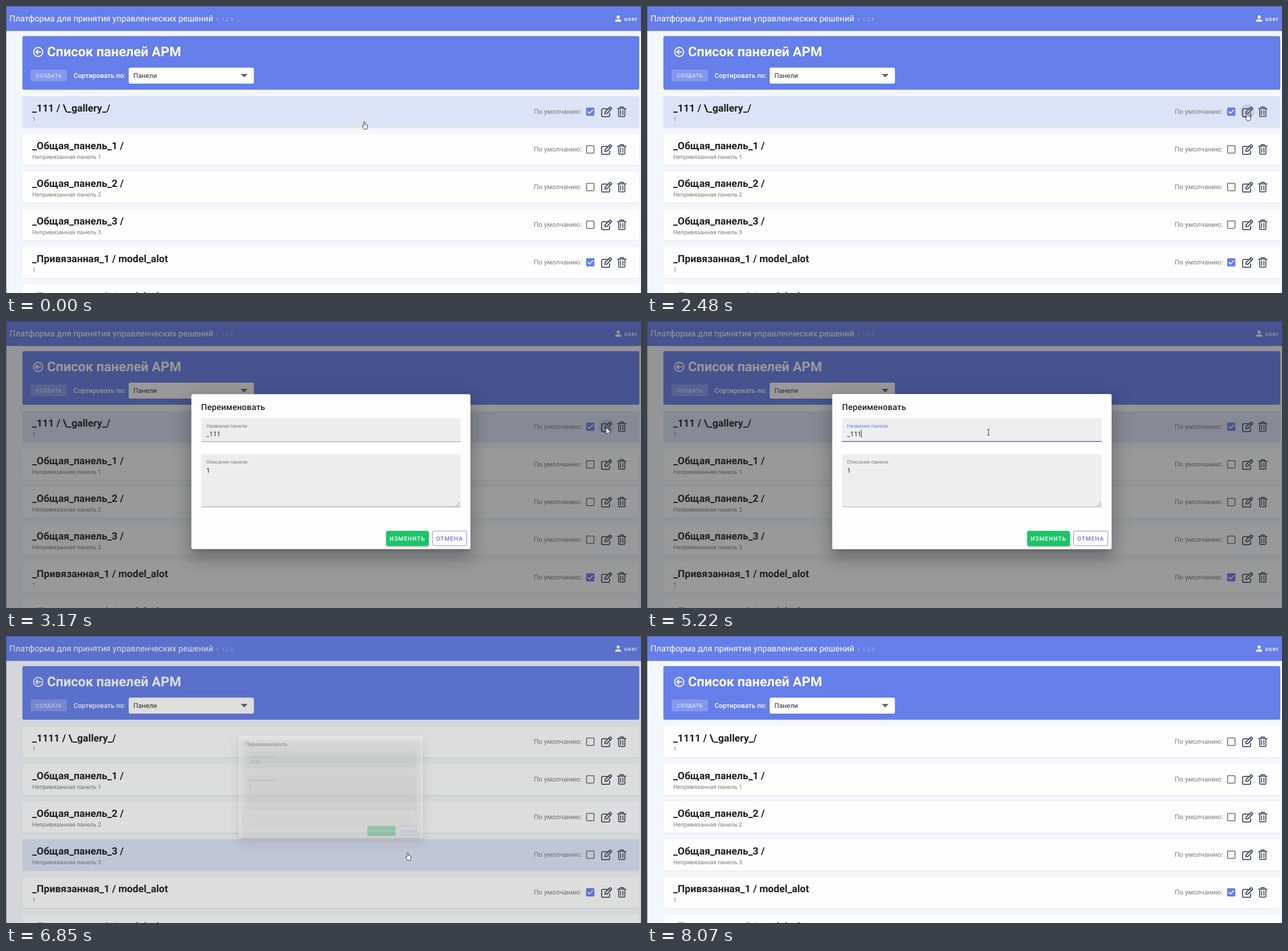
An HTML page with a canvas for the animation above (8470 ms loop, 1113 px wide and 503 px high).

```html
<!DOCTYPE html>
<html lang="ru">
<head>
<meta charset="utf-8">
<title>Список панелей</title>
<style>
  html, body { margin: 0; width: 100%; height: 100%; overflow: hidden; background: #f3f6fa; }
  canvas { display: block; }
</style>
</head>
<body>
<canvas id="stage" width="1113" height="503"></canvas>
<script>
const W = 1113, H = 503, LOOP = 8470, ZOOM = 0.733;
const ctx = document.getElementById('stage').getContext('2d');
ctx.textRendering = 'geometricPrecision';

const BLUE = '#667ee9', INK = '#1f1f1f', GREY = '#7b7b7b';

const STEPS = [0, 1310, 1460, 1585, 1710, 1850, 1980, 2120, 2240, 2360, 2480, 2900, 3020,
  3170, 3320, 3450, 3600, 3750, 3880, 4030, 4270, 4420, 4540, 4690, 5220, 5370, 5490, 5640,
  5780, 5900, 6020, 6140, 6420, 6550, 6700, 6850, 6980, 7100, 7500, 7630, 7770, 7920, 8070];

// time, x, y of the hot spot, shape
const POINTER = [
  [0, 628, 202, 'hand'], [1310, 703, 206, 'hand'], [1460, 790, 213, 'hand'],
  [1585, 893, 208, 'hand'], [1710, 960, 186, 'hand'], [1850, 1002, 186, 'hand'],
  [1980, 1018, 186, 'hand'], [2120, 1034, 187, 'hand'], [2240, 1047, 187, 'hand'],
  [2360, 1052, 187, 'hand'], [3170, 1052, 187, 'arrow'], [3320, 900, 186, 'arrow'],
  [3450, 745, 181, 'beam'], [3600, 664, 182, 'beam'], [3750, 632, 177, 'beam'],
  [3880, 606, 176, 'beam'], [4030, 600, 188, 'beam'], [5220, 598, 195, 'beam'],
  [5490, 596, 268, 'beam'], [5640, 612, 348, 'arrow'], [5780, 640, 366, 'arrow'],
  [5900, 664, 383, 'arrow'], [6020, 690, 392, 'hand'], [6140, 704, 384, 'hand'],
  [6420, 704, 379, 'hand'], [7500, 704, 477, 'arrow'], [7630, 664, 335, 'arrow'],
  [7770, 714, 344, 'arrow'], [7920, 724, 331, 'arrow'], [8070, 0, 0, 'none']
];

const HAND = new Path2D('M3 8V1.5a1.1 1.1 0 0 1 2.2 0V5.5l3.6.8q1.2.4 1.2 1.6l-.6 3.4L8.5 14H4L.6 9.2q-.4-1 .6-1.2z');
const ARROW = new Path2D('M0 0V11l2.6-2.4L4.3 12.4l1.6-.7L4.3 8H7.8z');
const BEAM = new Path2D('M-2 -5H-.6L0-4.4.6-5H2M0-4.4V4.4M-2 5H-.6L0 4.4.6 5H2');
const EDIT = new Path2D('M10.5 3.2H3q-2 0-2 2V15q0 2 2 2h10q2 0 2-2v-4M6.5 11.8l.6-3.2 8-8q.9-.8 1.8 0l1.2 1.2q.8.9 0 1.8l-8 8zM13.4 2.4l3 3');
const TRASH = new Path2D('M.3 3.4h14.6M4.7 3V.9h5.8v2.1M2.2 3.6V16q0 1.4 1.4 1.4h8q1.4 0 1.4-1.4V3.6M5.6 6.8v7.2M9.6 6.8v7.2');
const BACK = new Path2D('M4.2 0H-4M-.6-3.7-4.2 0-.6 3.7');
const CHECK = new Path2D('M3 7.4 6 10.3 11.6 4.4');
const PERSON = new Path2D('M0-5.6a2.8 2.8 0 1 1-.01 0M-5.2 5.4V4q0-2.8 3-2.8h4.4q3 0 3 2.8v1.4z');

const clamp = v => Math.min(1, Math.max(0, v));
const ease = v => 1 - Math.pow(1 - clamp(v), 2.2);
const ramp = (t, start, span) => ease((t - start) / span);
const lastStep = t => STEPS.filter(s => s <= t).pop();

function box(x, y, w, h, fill, radius = 0) {
  ctx.beginPath();
  ctx.roundRect(x, y, w, h, radius);
  ctx.fillStyle = fill;
  ctx.fill();
}

function text(str, x, y, size, color, weight = 400, spacing = 0) {
  ctx.font = `${weight} ${size * ZOOM}px Roboto, sans-serif`;
  ctx.letterSpacing = `${spacing * size * ZOOM}px`;
  ctx.fillStyle = color;
  ctx.fillText(str, x, y);
}

function shape(path, x, y, { fill, stroke, width = 1 }) {
  ctx.save();
  ctx.translate(x, y);
  ctx.lineCap = ctx.lineJoin = 'round';
  if (fill) { ctx.fillStyle = fill; ctx.fill(path); }
  if (stroke) { ctx.strokeStyle = stroke; ctx.lineWidth = width; ctx.stroke(path); }
  ctx.restore();
}

// Casts only a shadow; the caster itself stays off the stage.
function shadow(x, y, w, h, dy, blur, spread, alpha, scale = 1) {
  const far = 4000;
  ctx.save();
  ctx.shadowColor = `rgba(0,0,0,${alpha})`;
  ctx.shadowBlur = blur * scale;
  ctx.shadowOffsetX = far * scale;
  ctx.shadowOffsetY = dy * scale;
  box(x - far - spread, y - spread, w + 2 * spread, h + 2 * spread, '#000', 3);
  ctx.restore();
}

function header() {
  box(0, 0, W, 43.7, BLUE);
  text('Платформа для принятия управленческих решений', 6, 27.2, 20, '#fff');
  text('v. 1.2.9', 368.5, 26.2, 12, 'rgba(255,255,255,.45)', 400, 0.033);
  shape(PERSON, 1073, 22.2, { fill: '#fff' });
  text('user', 1083.5, 25.8, 14, '#fff', 500, 0.089);

  box(28.7, 52.7, 1081.3, 94, BLUE, 3);
  ctx.beginPath();
  ctx.arc(56.5, 80.5, 8, 0, 7);
  ctx.strokeStyle = '#fff';
  ctx.lineWidth = 1.8;
  ctx.stroke();
  shape(BACK, 56.5, 80.5, { stroke: '#fff', width: 1.8 });
  text('Список панелей АРМ', 72, 88, 32, '#fff', 700);
  box(43, 111.3, 64, 20.8, 'rgba(255,255,255,.2)', 3);
  text('СОЗДАТЬ', 52.6, 125, 12, 'rgba(255,255,255,.78)', 500, 0.089);
  text('Сортировать по:', 118.5, 126, 16, '#fff', 500);
  box(215, 108, 219.5, 28, '#fff', 3);
  text('Панели', 223.3, 126.2, 16, '#2c2c2c');
  ctx.beginPath();
  ctx.moveTo(411.5, 119);
  ctx.lineTo(423.5, 119);
  ctx.lineTo(417.5, 125.2);
  ctx.fillStyle = '#686868';
  ctx.fill();
}

function checkbox(x, y, on) {
  if (on) {
    box(x, y, 14.5, 14.5, BLUE, 2);
    shape(CHECK, x, y, { stroke: '#fff', width: 1.6 });
  } else {
    ctx.beginPath();
    ctx.roundRect(x + 0.8, y + 0.8, 13, 13, 1);
    ctx.strokeStyle = '#717171';
    ctx.lineWidth = 1.6;
    ctx.stroke();
  }
}

function row(index, { title, note, on }, hovered, editHover) {
  const y = 158.3 + index * 66;
  shadow(28.7, y, 1081.3, 54.4, 1, 2, 0, 0.07);
  box(28.7, y, 1081.3, 54.4, hovered ? '#dde3f7' : '#fefefe', 3);
  text(title, 46, y + 26.8, 24, INK, 700);
  text(note, 46, y + 43.4, 14, GREY);
  text('По умолчанию:', 925, y + 31, 16, GREY);
  checkbox(1016.8, y + 19.6, on);
  if (editHover) {
    ctx.beginPath();
    ctx.arc(1052.5, y + 27, 13, 0, 7);
    ctx.fillStyle = 'rgba(60,75,100,.13)';
    ctx.fill();
  }
  shape(EDIT, 1043, y + 18.6, { stroke: '#434e63', width: 1.8 });
  shape(TRASH, 1071.7, y + 18, { stroke: '#434e63', width: 1.7 });
}

function page(t) {
  const saved = t >= 6850;
  const rows = [
    { title: `_111${saved ? '1' : ''} / \\_gallery_/`, note: '1', on: !saved },
    ...[1, 2, 3].map(n => ({ title: `_Общая_панель_${n} /`, note: `Непривязанная панель ${n}` })),
    ...[1, 2].map(n => ({ title: `_Привязанная_${n} / model_alot`, note: '1', on: true }))
  ];
  const hovered = t < 6850 ? 0 : t < 7500 ? 3 : -1;
  box(0, 0, W, H, '#f3f6fa');
  header();
  rows.forEach((r, i) => row(i, r, i === hovered, i === 0 && t >= 2240 && t < 3320));
}

function field(y, h, label, shade, focus, line) {
  box(342, y, 455, h, `rgba(0,0,0,${shade})`, [3, 3, 0, 0]);
  box(342, y + h - 0.6, 455, 0.9, shade > 0.07 ? '#555' : '#949494');
  if (line > 0) box(569.5 - 227.5 * line, y + h - 1, 455 * line, 1.5, '#5468d6');
  text(label, 350.6, y + 17, 12, focus ? BLUE : GREY);
}

function dialog(t, scale) {
  const focus = t >= 4270 && t < 6420;
  const line = ramp(t, 4140, 300) - ramp(t, 6390, 300);
  const nameHover = t >= 3600 && t < 4420 ? (t < 4030 ? 0.095 : 0.12) : 0.062;
  const noteHover = t === 5640 ? 0.1 : 0.062;

  for (const [dy, blur, spread, a] of [[8, 11, -5, 0.2], [17.6, 28, 2.2, 0.14], [6.6, 34, 5.9, 0.12]])
    shadow(324.6, 128, 489.8, 272, dy, blur, spread, a, scale);
  box(324.6, 128, 489.8, 272, '#fefefe', 3);
  text('Переименовать', 341.8, 156, 20, INK, 500, 0.0125);

  field(170, 41.6, 'Название панели', nameHover, focus, line);
  text(t < 5370 ? '_111' : '_1111', 350.8, 202, 16, '#2a2a2a');
  const caret = focus && (t < 4690 || (t >= 5220 && t < 5900));
  if (caret) box(t < 5370 ? 375.4 : 382, 190.5, 0.9, 14, '#222');

  field(233.4, 92.6, 'Описание панели', noteHover, false, 0);
  text('1', 350.8, 266.3, 16, '#2a2a2a');
  shape(new Path2D('M789 324.5 796 317.5M793 324.5 796 321.5'), 0, 0, { stroke: '#777', width: 0.8 });

  shadow(666.5, 367.8, 74.8, 26.4, 1.6, 3, 0, 0.35, scale);
  box(666.5, 367.8, 74.8, 26.4, t >= 6020 ? '#37cb7b' : '#1cc468', 3);
  text('ИЗМЕНИТЬ', 672.4, 384.8, 14, '#fff', 500, 0.089);
  ctx.beginPath();
  ctx.roundRect(747.6, 368.2, 60.2, 25.6, 3);
  ctx.strokeStyle = '#8079e6';
  ctx.lineWidth = 0.9;
  ctx.stroke();
  text('ОТМЕНА', 754, 384.8, 14, '#766fe2', 500, 0.089);
}

function modal(t) {
  const shown = t < 6700 ? ramp(t, 2890, 300) : 1 - ramp(t, 6720, 320);
  if (shown <= 0) return;
  box(0, 0, W, H, `rgba(33,33,33,${0.46 * shown})`);
  const scale = 0.5 + 0.5 * shown;
  ctx.save();
  ctx.globalAlpha = shown;
  ctx.translate(569.5, 264);
  ctx.scale(scale, scale);
  ctx.translate(-569.5, -264);
  dialog(t, scale);
  ctx.restore();
}

function pointer(t) {
  const [, x, y, kind] = POINTER.filter(p => p[0] <= t).pop();
  if (kind === 'hand') shape(HAND, x - 4, y, { fill: '#fff', stroke: '#222', width: 0.9 });
  if (kind === 'arrow') shape(ARROW, x, y, { fill: '#fff', stroke: '#333', width: 0.7 });
  if (kind === 'beam') shape(BEAM, x + 0.5, y, { stroke: '#222', width: 0.9 });
}

function draw(now) {
  const t = lastStep(now % LOOP);
  page(t);
  modal(t);
  box(0, 0, W, 0.8, 'rgba(50,50,60,.6)');
  box(0, 0, 0.8, H, 'rgba(50,50,60,.6)');
  pointer(t);
}

const start = performance.now();
function tick() {
  draw(performance.now() - start);
  requestAnimationFrame(tick);
}
tick();
</script>
</body>
</html>
```
